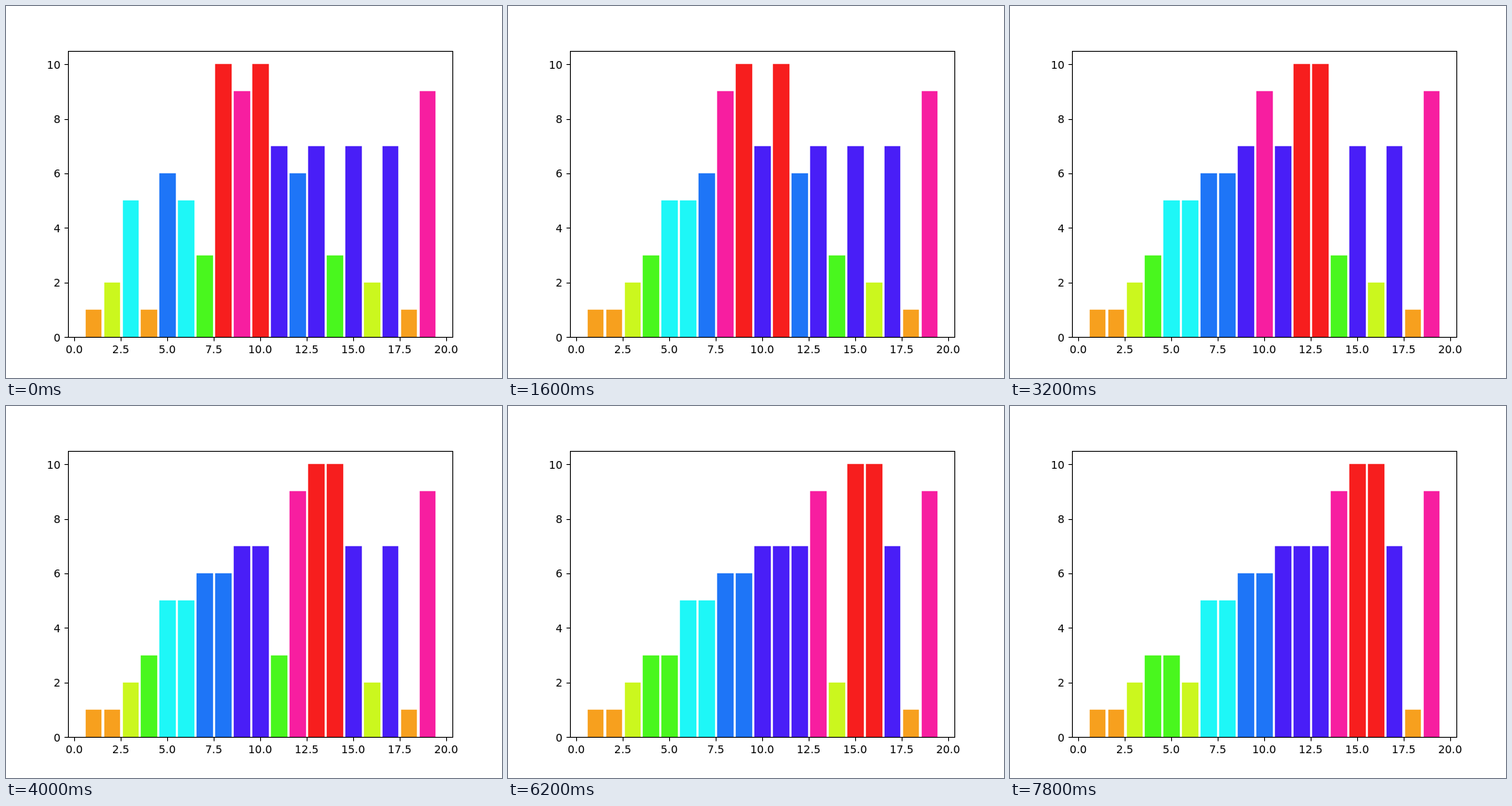
An HTML page for the animation above (8 s loop, 640 by 480 pixels).

```html
<!DOCTYPE html>
<html lang="en">
<head>
<meta charset="utf-8">
<title>Insertion sort</title>
<style>
  html, body { margin: 0; width: 100%; height: 100%; overflow: hidden; background: #fff; }
  svg { display: block; width: 640px; height: 480px; }
  text { font: 13.889px "DejaVu Sans", sans-serif; }
  .axis { fill: none; stroke: #000; stroke-width: 1.111; }
  .x { text-anchor: middle; }
  .y { text-anchor: end; }
</style>
</head>
<body>
<svg viewBox="0 0 640 480">
  <clipPath id="plot"><rect x="80" y="58" width="496" height="369"/></clipPath>
  <g id="bars" clip-path="url(#plot)"></g>
  <g id="axes"><rect class="axis" x="80.5" y="58.5" width="496" height="369"/></g>
</svg>
<script>
const STEP = 200, STEPS = 40;
const START = [1, 2, 5, 1, 6, 5, 3, 10, 9, 10, 7, 6, 7, 3, 7, 2, 7, 1, 9];
const EDGE = 1.389 / 2;

const xAt = v => 80 + (v + 0.34) * 496 / 20.68;
const yAt = v => 427.2 - v * 35.2;
const snap = p => Math.floor(p + 0.5) + 0.5;
const color = v => `hsl(${v * 36 % 360}, 93%, 54.3%)`;

function add(parent, name, attrs, text = "") {
  const el = document.createElementNS("http://www.w3.org/2000/svg", name);
  for (const key in attrs) el.setAttribute(key, attrs[key]);
  el.textContent = text;
  return parent.appendChild(el);
}

// One state per adjacent swap of the insertion sort.
function sortStates(values) {
  const a = [...values], states = [[...a]];
  for (let i = 1; i < a.length; i++) {
    for (let j = i; j > 0 && a[j - 1] > a[j]; j--) {
      [a[j - 1], a[j]] = [a[j], a[j - 1]];
      states.push([...a]);
    }
  }
  return states.slice(0, STEPS);
}

const axes = document.getElementById("axes");
for (let v = 0; v <= 20; v += 2.5) {
  const x = xAt(v);
  add(axes, "path", { class: "axis", d: `M${snap(x)} 427.5v5` });
  add(axes, "text", { class: "x", x, y: 448 }, v.toFixed(1));
}
for (let v = 0; v <= 10; v += 2) {
  const y = yAt(v);
  add(axes, "path", { class: "axis", d: `M80.5 ${snap(y)}h-5` });
  add(axes, "text", { class: "y", x: 70.3, y: Math.round(y + 5.35) }, v);
}

const states = sortStates(START);
const group = document.getElementById("bars");
const bars = START.map((_, i) => {
  const left = snap(xAt(i + 0.6)) - EDGE;
  const right = snap(xAt(i + 1.4)) + EDGE;
  return add(group, "rect", { x: left, width: right - left });
});

let shown = -1;
function draw(time) {
  const step = Math.floor(time / STEP) % STEPS;
  if (step !== shown) {
    shown = step;
    bars.forEach((bar, i) => {
      const value = states[step][i], top = snap(yAt(value)) - EDGE;
      bar.setAttribute("y", top);
      bar.setAttribute("height", 428 - top);
      bar.setAttribute("fill", color(value));
    });
  }
}

const begin = performance.now();
function tick() {
  draw(performance.now() - begin);
  requestAnimationFrame(tick);
}
tick();
</script>
</body>
</html>
```
